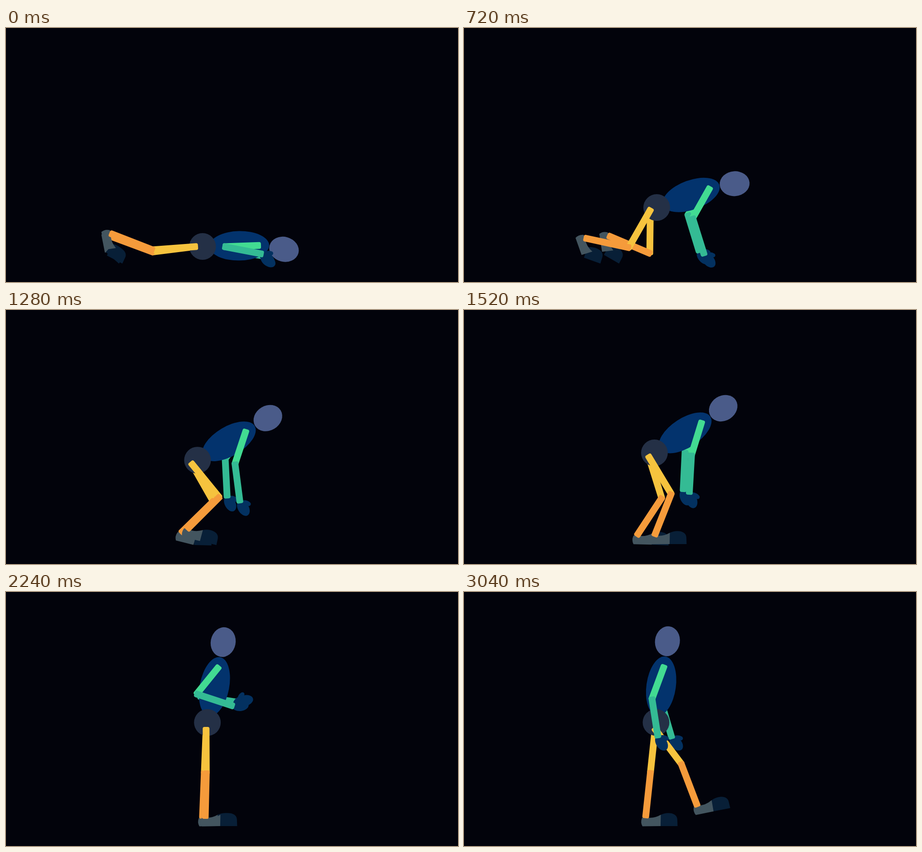
An HTML page with a canvas that plays this animation: 998x561 px, repeating every 3120 ms.

```html
<!DOCTYPE html>
<html lang="en">
<head>
<meta charset="utf-8">
<title>Getting up</title>
<style>
  html, body { margin: 0; width: 100%; height: 100%; overflow: hidden; background: #02030b; }
  canvas { display: block; width: 998px; height: 561px; }
</style>
</head>
<body>
<canvas id="stage" width="998" height="561"></canvas>
<script>
const ctx = document.getElementById('stage').getContext('2d');
const LOOP = 3120, STEP = 80;
const FLOOR = 520, STAND = 498;   // ground, and ankle height of a flat foot
const ARM = { a: 75.5, b: 84, bend: 1 };
const LEG = { a: 96, b: 99, bend: -1 };
const RAD = Math.PI / 180;

const C = {
  back: '#02030b', head: '#4a5b89', torso: '#03336d', hip: '#243046',
  upper: '#42db92', fore: '#34bb94', hand: '#033160',
  thigh: '#f6c33e', shin: '#f59b3b', heel: '#43555f', toe: '#081f37'
};

// Key points: lying, crawling, kneeling, crouching, rising, upright, stepping.
const POSES = [0, 720, 1040, 1520, 1920, 2640, 3040];
const LEAN = [1, 20, 24.5, 33, 72, 82, 82];
const HIP = [[434, 482.5], [425.5, 396.5], [430, 380], [420.5, 315.5], [463, 289], [436.5, 288], [424, 288]];
const NEAR_HAND = [[565, 499], [530, 500], [573, 480], [497.5, 404], [552, 318], [478, 222], [428, 319]];
const FAR_HAND = [[566, 503], [519, 493], [501, 455], [484, 398], [574.5, 298], [483, 219], [458.5, 321]];
const NEAR_FOOT = [[231, 454], [267, 464], [340, 441], [421], [456.5], [432.5], [515, 472]];
const FAR_FOOT = [[231, 460], [319, 459], [401, 474], [382], [437], [432.5], [401]];

const clamp = (v, lo, hi) => Math.max(lo, Math.min(hi, v));
const mix = (a, b, u) => a + (b - a) * u;

// Every move pushes off fast and settles into the next pose.
function moment(t) {
  let i = 0;
  while (i < POSES.length - 2 && t >= POSES[i + 1]) i++;
  const u = clamp((t - POSES[i]) / (POSES[i + 1] - POSES[i]), 0, 1);
  return { i, u: 1 - (1 - u) ** 2 };
}

const value = (list, { i, u }) => mix(list[i], list[i + 1], u);

function point(list, { i, u }) {
  const [x0, y0 = STAND] = list[i], [x1, y1 = STAND] = list[i + 1];
  return { x: mix(x0, x1, u), y: mix(y0, y1, u) };
}

// The head follows the spine, but looks down on all fours and at the hands.
function nod(t) {
  const crawl = clamp((1040 - t) / 320, 0, 1);
  const hands = clamp(1 - Math.abs(t - 2640) / 400, 0, 1);
  return 16 * crawl + 28 * hands;
}

const along = (p, deg, d) => ({
  x: p.x + d * Math.cos(deg * RAD),
  y: p.y + d * Math.sin(deg * RAD)
});

const heading = (p, q) => (Math.atan2(q.y - p.y, q.x - p.x) / RAD + 360) % 360;

// Two-bone reach: the directions of both bones and the joint between them.
function reach(from, to, { a, b, bend }) {
  const d = clamp(Math.hypot(to.x - from.x, to.y - from.y), Math.abs(a - b), a + b);
  const open = Math.acos(clamp((a * a + d * d - b * b) / (2 * a * d), -1, 1)) / RAD;
  const first = heading(from, to) + bend * open;
  const joint = along(from, first, a);
  return { first, joint, second: heading(joint, to) };
}

function at(p, deg, draw) {
  ctx.save();
  ctx.translate(p.x, p.y);
  ctx.rotate(deg * RAD);
  ctx.beginPath();
  draw();
  ctx.restore();
}

function fill(color) {
  ctx.fillStyle = color;
  ctx.fill();
}

function oval(p, deg, rx, ry, color) {
  at(p, deg, () => {
    ctx.ellipse(0, 0, rx, ry, 0, 0, 2 * Math.PI);
    fill(color);
  });
}

function bone(p, deg, len, color) {
  at(p, deg, () => {
    ctx.roundRect(-5, -7.5, len + 9, 15, 4);
    fill(color);
  });
}

function mitten(p, deg) {
  at(p, deg, () => {
    ctx.ellipse(16.5, 1, 18.5, 12, 0, 0, 2 * Math.PI);
    fill(C.hand);
    ctx.beginPath();
    ctx.moveTo(5, -4);
    ctx.quadraticCurveTo(8, -12, 15, -14);
    ctx.lineWidth = 9;
    ctx.lineCap = 'round';
    ctx.strokeStyle = C.hand;
    ctx.stroke();
  });
}

// The toes bend where they would otherwise go through the floor.
function toeAngle(hinge, foot) {
  const drop = (FLOOR - hinge.y) / Math.hypot(37, 10);
  if (drop >= 1) return foot;
  return Math.min(foot, (Math.asin(drop) - Math.atan2(10, 37)) / RAD);
}

function shoe(p, deg) {
  const hinge = along(along(p, deg, 33), deg + 90, 9);
  at(hinge, toeAngle(hinge, deg), () => {
    ctx.moveTo(-1, -14);
    ctx.bezierCurveTo(12, -22, 37, -21, 37, -4);
    ctx.lineTo(37.5, 10);
    ctx.lineTo(-1, 10);
    fill(C.toe);
  });
  at(p, deg, () => {
    ctx.moveTo(-8, 1);
    ctx.quadraticCurveTo(-4, -2, 2, 0);
    ctx.quadraticCurveTo(18, 3, 33.5, -6);
    ctx.lineTo(33, 19);
    ctx.lineTo(-7, 19.5);
    ctx.quadraticCurveTo(-12, 11, -8, 1);
    fill(C.heel);
  });
}

function arm(shoulder, wrist, prone) {
  const { first, joint, second } = reach(shoulder, wrist, ARM);
  bone(shoulder, first, ARM.a, C.upper);
  mitten(wrist, second - 24 + 55 * prone);
  bone(joint, second, ARM.b, C.fore);
}

function leg(top, ankle) {
  const { first, joint, second } = reach(top, ankle, LEG);
  bone(top, first, LEG.a, C.thigh);
  // The sole stays level until the ankle runs out of bend.
  shoe(ankle, second - clamp(second, 80, 121));
  bone(joint, second, LEG.b - 1, C.shin);
}

function draw(t) {
  ctx.fillStyle = C.back;
  ctx.fillRect(0, 0, 998, 561);

  const now = moment(t);
  const hip = point(HIP, now);
  const lean = value(LEAN, now);
  const up = -lean;
  const tilt = up + nod(t);
  const prone = clamp(1 - lean / 20, 0, 1);
  const shoulder = along(hip, up, 124);
  const legTop = along(hip, up, -15);

  arm(shoulder, point(FAR_HAND, now), prone);
  leg(legTop, point(FAR_FOOT, now));
  oval(along(hip, up, 81), up, 66, 32.5, C.torso);
  oval(along(along(hip, up, 147), tilt, 34), tilt, 33, 27.5, C.head);
  oval(hip, 0, 29.5, 29.5, C.hip);
  leg(legTop, point(NEAR_FOOT, now));
  arm(shoulder, point(NEAR_HAND, now), prone);
}

const start = performance.now();
function tick() {
  const t = (performance.now() - start) % LOOP;
  draw(Math.floor(t / STEP) * STEP);
  requestAnimationFrame(tick);
}
tick();
</script>
</body>
</html>
```
